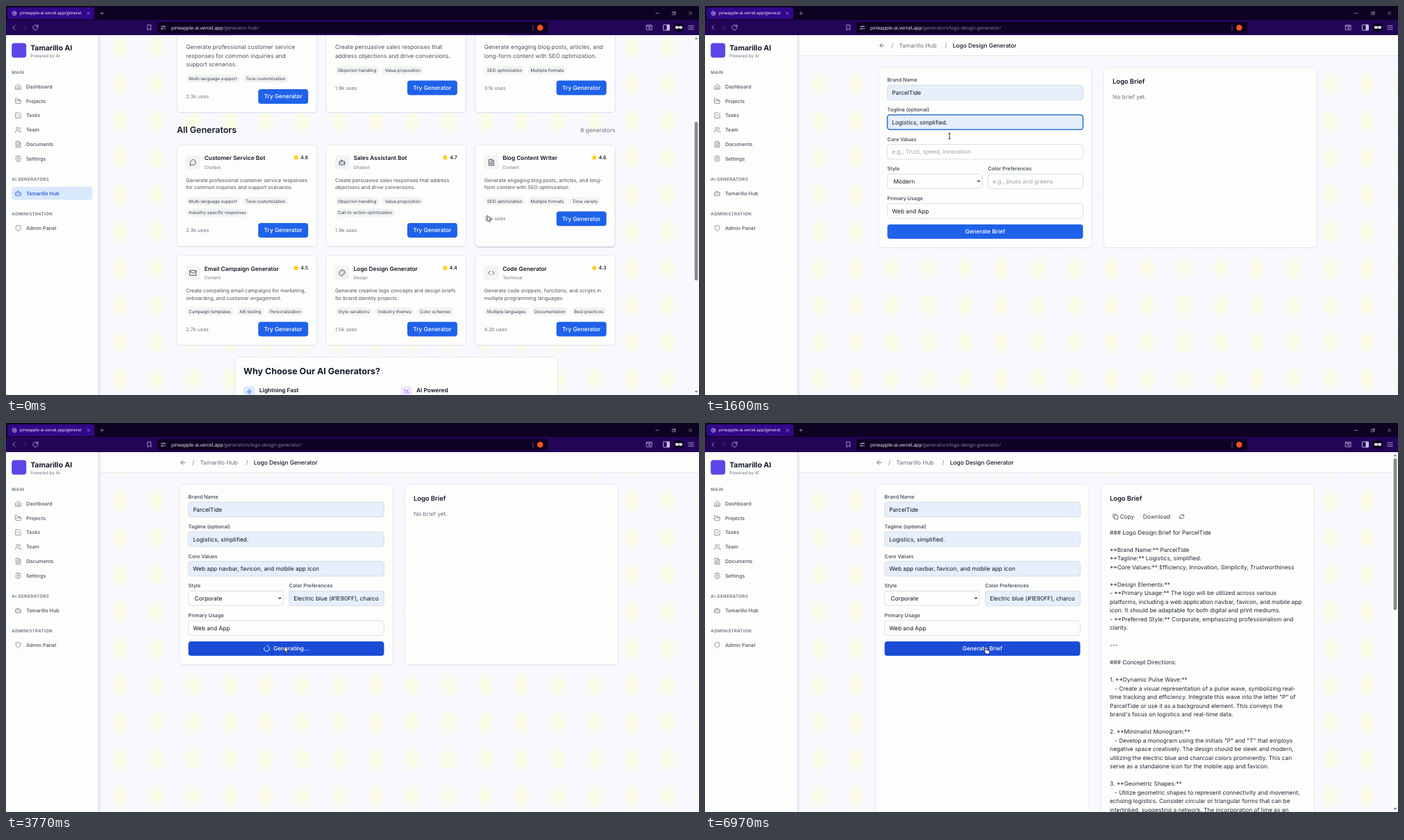
Recreate the animation shown at these times as an HTML page. Size 998x561 px, loop 7 s.

```html
<!DOCTYPE html>
<html lang="en">
<head>
<meta charset="utf-8">
<style>
html, body { margin: 0; width: 100%; height: 100%; overflow: hidden; background: #f8f8fe; }
svg { display: block; width: 998px; height: 561px; font-family: Inter, "Open Sans", sans-serif; }
text { white-space: pre; text-rendering: geometricPrecision; }
.ui { font-family: "Open Sans", "Noto Sans", sans-serif; }
</style>
</head>
<body>
<svg viewBox="0 0 998 561">
  <defs>
    <radialGradient id="glow">
      <stop offset=".3" stop-color="#fbfbe4"/><stop offset="1" stop-color="#fbfbe4" stop-opacity="0"/>
    </radialGradient>
    <pattern id="dots" x="137.7" y="352" width="52.6" height="53.2" patternUnits="userSpaceOnUse">
      <ellipse cx="26.3" cy="26.6" rx="15" ry="21" fill="url(#glow)"/>
    </pattern>
    <linearGradient id="edge">
      <stop stop-color="#d9dae6"/><stop offset="1" stop-color="#f0f0f8" stop-opacity="0"/>
    </linearGradient>
  </defs>
  <g id="page"></g><g id="side"></g><g id="chrome"></g><g id="bar"></g><g id="pointer"></g>
</svg>
<script>
const XS = 6.24, SM = 7.28, MD = 8.32, LG = 9.36, XL = 10.4, XXL = 12.48;
const INK = '#111827', GREY = '#6b7280', TEXT = '#4b5563', PALE = '#9ca3af';
const WHITE = '#fdfefc', LINE = '#e0e3e9', BLUE = '#1f62ea', DEEP = '#1a4cd6';
const $ = id => document.getElementById(id);

const icons = {
  home: 'M3 10l9-7 9 7v11H3zM9 21v-9h6v9',
  folder: 'M6 14l1.5-3H22l-2 9H4a2 2 0 0 1-2-2V4h6l2 3h8v4',
  check: 'M9 11l3 3L22 4M21 12v9H3V3h13',
  users: 'M2 21v-2a4 4 0 0 1 4-4h6a4 4 0 0 1 4 4v2M9 3a4 4 0 1 0 .1 0M22 21v-2a4 4 0 0 0-3-3.9M16 3.1a4 4 0 0 1 0 7.8',
  doc: 'M14 2H4v20h16V8zM14 2v6h6M16 13H8M16 17H8M10 9H8',
  gear: 'M12 9a3 3 0 1 0 .1 0M10 2h4l1 3 3-1 3 4-2 3v2l2 3-3 4-3-1-1 3h-4l-1-3-3 1-3-4 2-3v-2l-2-3 3-4 3 1z',
  bot: 'M12 8V4H8M4 8h16v12H4zM2 14h2M20 14h2M15 13v2M9 13v2',
  shield: 'M12 22s8-4 8-10V5l-8-3-8 3v7c0 6 8 10 8 10',
  chat: 'M7.9 20A9 9 0 1 0 4 16.1L2 22z',
  mail: 'M2 4h20v16H2zM22 7l-10 6L2 7',
  palette: 'M12 2a10 10 0 1 0 0 20c3 0 2-3 1.5-4s0-3 2-3h3c2 0 3.5-1.5 3.5-3.5C22 6 17.5 2 12 2M7 12h.1M9 7.5h.1M14 6.5h.1M18 10h.1',
  code: 'M16 18l6-6-6-6M8 6l-6 6 6 6',
  zap: 'M13 2L3 14h9l-1 8 10-12h-9z',
  wand: 'M4 20L20 4M14 6l4 4M5 4v4M3 6h4M19 14v4M17 16h4',
  trend: 'M22 7l-8.5 8.5-5-5L2 17M16 7h6v6',
  note: 'M21 15a2 2 0 0 1-2 2H7l-4 4V5a2 2 0 0 1 2-2h14a2 2 0 0 1 2 2z',
  copy: 'M8 8h14v14H8zM4 16H2V2h14v2',
  refresh: 'M3 12a9 9 0 0 1 15-6.7L21 8M21 3v5h-5M21 12a9 9 0 0 1-15 6.7L3 16M3 21v-5h5',
  reload: 'M21 12a9 9 0 1 1-3-6.7L21 8M21 2v6h-6',
  back: 'M12 19l-7-7 7-7M19 12H5',
  left: 'M15 4l-8 8 8 8', right: 'M9 4l8 8-8 8', down: 'M4 8l8 8 8-8',
  cross: 'M4 4l16 16M20 4L4 20', plus: 'M12 3v18M3 12h18', minus: 'M3 12h18',
  box: 'M4 4h16v16H4z', windows: 'M3 8h13v13H3zM8 8V3h13v13h-5',
  mark: 'M6 2h12v20l-6-5-6 5z', tune: 'M2 7h9M17 7h5M14 4a3 3 0 1 0 .1 0M13 17h9M2 17h1M7 14a3 3 0 1 0 .1 0',
  globe: 'M12 2a10 10 0 1 0 .1 0M4 7l7 4-2 5 4 5M21 8l-7 1 1 5 5 1',
  menu: 'M2 5h20M2 12h20M2 19h20', find: 'M2 3h20v18H2zM2 7h20M12 10a3 3 0 1 0 .1 0M14 15l3 3',
  star: 'M12 1l3.4 7 7.6 1-5.600 5.300 1.400 7.700L12 18.300 5.200 22l1.400-7.700L1 9l7.600-1z'
};

// y is the middle of the capitals
const T = (x, y, size, weight, fill, str, anchor = 'start', extra = '') =>
  `<text x="${x}" y="${y + size * .36}" font-size="${size}" font-weight="${weight}" fill="${fill}" text-anchor="${anchor}" ${extra}>${str}</text>`;
const R = (x, y, w, h, fill, r = 0, stroke = 'none', sw = .7) =>
  `<rect x="${x}" y="${y}" width="${w}" height="${h}" rx="${r}" fill="${fill}" stroke="${stroke}" stroke-width="${sw}"/>`;
const I = (name, x, y, size, color, fill = 'none', sw = 2) =>
  `<path d="${icons[name]}" transform="translate(${x - size / 2} ${y - size / 2}) scale(${size / 24})" fill="${fill}" stroke="${color}" stroke-width="${sw}" stroke-linecap="round" stroke-linejoin="round"/>`;
const panel = (x, y, w, h, stroke = LINE) =>
  R(x, y + .8, w, h, '#dfe1ea', 5) + R(x, y, w, h, WHITE, 5, stroke);
const backdrop = () => R(133, 0, 865, 700, '#f8f8fe') + R(133, 0, 865, 700, 'url(#dots)');

const pen = document.createElement('canvas').getContext('2d');
function chips(x, y, rows) {
  pen.font = `400 ${XS}px Inter`;
  return rows.split('/').map((row, i) => {
    let cx = x;
    return row.split('|').map(label => {
      const w = pen.measureText(label).width + 8.32, cy = y + i * 16.6;
      const out = R(cx, cy - 6, w, 12, '#f2f4f4', 6) + T(cx + 4.16, cy, XS, 400, '#374151', label);
      cx += w + 4.16;
      return out;
    }).join('');
  }).join('');
}
const action = (x, y, uses) =>
  T(x + 13, y, SM, 400, GREY, uses + 'k uses') + R(x + 117, y - 10.5, 72, 21, BLUE, 4) +
  T(x + 153, y, MD, 500, '#fff', 'Try Generator', 'middle');

const columns = [246.2, 460.9, 675.7];
const featured = [
  ['Generate professional customer service/responses for common inquiries and/support scenarios.', 'Multi-language support|Tone customization', 2.3],
  ['Create persuasive sales responses that/address objections and drive conversions.', 'Objection handling|Value proposition', 1.9],
  ['Generate engaging blog posts, articles, and/long-form content with SEO optimization.', 'SEO optimization|Multiple formats', 3.1]
];
const generators = [
  ['chat', 'Customer Service Bot', 'Chatbot', 4.8, 'Generate professional customer service responses/for common inquiries and support scenarios.', 'Multi-language support|Tone customization/Industry-specific responses', 2.3],
  ['bot', 'Sales Assistant Bot', 'Chatbot', 4.7, 'Create persuasive sales responses that address/objections and drive conversions.', 'Objection handling|Value proposition/Call-to-action optimization', 1.9],
  ['doc', 'Blog Content Writer', 'Content', 4.6, 'Generate engaging blog posts, articles, and long-/form content with SEO optimization.', 'SEO optimization|Multiple formats|Tone variety', 3.1],
  ['mail', 'Email Campaign Generator', 'Content', 4.5, 'Create compelling email campaigns for marketing,/onboarding, and customer engagement.', 'Campaign templates|A/B testing|Personalization'.replace('A/B', 'A\u2215B'), 2.7],
  ['palette', 'Logo Design Generator', 'Design', 4.4, 'Generate creative logo concepts and design briefs/for brand identity projects.', 'Style variations|Industry themes|Color schemes', 1.5],
  ['code', 'Code Generator', 'Technical', 4.3, 'Generate code snippets, functions, and scripts in/multiple programming languages.', 'Multiple languages|Documentation|Best practices', 4.2]
];
const reasons = [
  ['zap', '#dbeafe', '#2563eb', 'Lightning Fast', 'Generate high-quality content in seconds, not hours'],
  ['wand', '#f3e8ff', '#9333ea', 'AI Powered', 'Advanced AI models trained on millions of examples'],
  ['trend', '#dcfce7', '#16a34a', 'SEO Optimized', 'Built-in SEO best practices for better search rankings'],
  ['note', '#dbeafe', '#2563eb', 'Customizable', 'Tailor outputs to match your brand voice and style']
];

function hub(hover) {
  let out = backdrop();
  featured.forEach(([text, tags, uses], i) => {
    const x = columns[i], lines = text.split('/'), gap = 12.5 * (lines.length - 2);
    out += panel(x, 0, 201.5, 153.5, '#cbdcf5') + R(x + 44, 34, 36, 11, '#eaeef8', 5);
    lines.forEach((l, k) => out += T(x + 13, 59.5 + 12.5 * k, MD, 400, TEXT, l));
    out += chips(x + 13, 92.5 + gap, tags) + action(x, 118 + gap, uses);
  });
  out += T(246, 179, XXL, 600, INK, 'All Generators') + T(877.5, 179.5, MD, 400, GREY, '6 generators', 'end');
  generators.forEach(([icon, name, kind, score, text, tags, uses], i) => {
    const x = columns[i % 3], y = i < 3 ? 200.3 : 359.6, rows = tags.split('/').length;
    if (hover && i == 2) out += R(x - .5, y + 1, 202.5, 147.500, '#d3d6df', 6);
    out += panel(x, y, 201.5, i < 3 ? 146.3 : 129.5) + R(x + 13, y + 15, 20.500, 20.500, '#f2f3f4', 4) +
      I(icon, x + 23.2, y + 25.3, 10.4, '#374151') + T(x + 39.5, y + 19, MD, 600, INK, name) +
      T(x + 39.5, y + 32.2, XS, 400, GREY, kind) + I('star', x + 171.5, y + 18, 8, '#facc15', '#facc15') +
      T(x + 189, y + 18, SM, 500, INK, score, 'end');
    text.split('/').forEach((l, k) => out += T(x + 13, y + 51 + 10.5 * k, SM, 400, TEXT, l));
    out += chips(x + 13, y + 81, tags) + action(x, y + 106.500 + 16.6 * (rows - 1), uses);
  });
  out += panel(329.7, 506.3, 465, 150) + T(342, 527, XXL, 700, INK, 'Why Choose Our AI Generators?');
  reasons.forEach(([icon, bg, color, name, text], i) => {
    const x = 342 + 226.2 * (i % 2), y = 555 + 31.2 * (i >> 1);
    out += R(x, y - 7, 16.600, 16.600, bg, 4) + I(icon, x + 8.3, y + 1.3, 8.300, color) +
      T(x + 22.800, y - .5, MD, 600, INK, name) + T(x + 22.800, y + 11, SM, 400, TEXT, text);
  });
  return out;
}

const brief = `### Logo Design Brief for ParcelTide

**Brand Name:** ParcelTide
**Tagline:** Logistics, simplified.
**Core Values:** Efficiency, Innovation, Simplicity, Trustworthiness

**Design Elements:**
- **Primary Usage:** The logo will be utilized across various
platforms, including a web application navbar, favicon, and mobile app
icon. It should be adaptable for both digital and print mediums.
- **Preferred Style:** Corporate, emphasizing professionalism and
clarity.

---

### Concept Directions:

1. **Dynamic Pulse Wave:**
   - Create a visual representation of a pulse wave, symbolizing real-
time tracking and efficiency. Integrate this wave into the letter "P" of
ParcelTide or use it as a background element. This conveys the
brand's focus on logistics and real-time data.

2. **Minimalist Monogram:**
   - Develop a monogram using the initials "P" and "T" that employs
negative space creatively. The design should be sleek and modern,
utilizing the electric blue and charcoal colors prominently. This can
serve as a standalone icon for the mobile app and favicon.

3. **Geometric Shapes:**
   - Utilize geometric shapes to represent connectivity and movement,
echoing logistics. Consider circular or triangular forms that can be
interlinked, suggesting a network. The incorporation of lime as an`.split('\n');

// label, x, y, width, placeholder, value
const fields = [
  ['Brand Name', 262.6, 114.2, 281.8, 'e.g., Ombrett', 'ParcelTide'],
  ['Tagline (optional)', 262.6, 157, 281.8, 'e.g., Payments, simplified.', 'Logistics, simplified.'],
  ['Core Values', 262.6, 199.6, 281.8, 'e.g., Trust, speed, innovation', 'Web app navbar, favicon, and mobile app icon'],
  ['Color Preferences', 407.6, 242.3, 136.800, 'e.g., blues and greens', 'Electric blue (#1E90FF), charco']
];

function input([label, x, y, w, hint, value], filled, focused) {
  return T(x, y - 7.5, SM, 500, '#374151', label) +
    R(x, y, w, 21.300, filled ? '#e6effb' : WHITE, 4, focused ? '#2f72d8' : '#d1d5db', focused ? 1.6 : .8) +
    T(x + 6.700, y + 10.8, MD, 400, filled ? INK : PALE, filled ? value : hint) +
    (focused && !filled ? R(x + 6.500, y + 6, .7, 10, INK) : '');
}

function form({ filled, focus, style, busy, hot, done }) {
  let out = R(133, 42, 865, 29.300, WHITE) + R(133, 71, 865, .8, LINE) + `<g transform="translate(${done ? -4 : 0})">` +
    I('back', 254.8, 57, 10, TEXT) + T(268, 57, MD, 400, GREY, '/') + T(279.5, 57, MD, 400, GREY, 'Tamarillo Hub') +
    T(345.5, 57, MD, 400, GREY, '/') + T(356.8, 57, MD, 500, INK, 'Logo Design Generator') +
    panel(250, 88.800, 307.3, done ? 500 : 259.700) + panel(574.2, 88.800, 307.3, done ? 500 : 259.700);
  fields.forEach((f, i) => out += input(f, i < filled, i == focus));
  out += T(262.6, 234.800, SM, 500, '#374151', 'Style') + R(262.6, 242.3, 136.800, 20.800, WHITE, 4, '#d1d5db', .8) +
    T(271.6, 252.8, MD, 400, INK, style) + I('down', 394.2, 252.6, 5, INK, 'none', 5) +
    input(['Primary Usage', 262.6, 285, 281.8, '', 'Web and App'], true).replace('#e6effb', WHITE) +
    R(262.6, 315, 281.8, 20.800, hot ? DEEP : BLUE, 4) +
    (busy ? T(385, 325.4, MD, 500, '#fff', 'Generating...') +
        '<path id="spin" d="M3.9 0A3.9 3.9 0 1 1 1.200 -3.700" fill="none" stroke="#fff" stroke-width=".9" stroke-linecap="round"/>'
      : T(403.500, 325.4, MD, 500, '#fff', 'Generate Brief', 'middle')) +
    T(587, 108.500, LG, 600, INK, 'Logo Brief');
  if (done) {
    out += I('copy', 595.2, 135, 8.300, '#374151') + T(601.5, 135, MD, 400, '#374151', 'Copy') +
      T(634.800, 135, MD, 400, '#374151', 'Download') + I('refresh', 690.6, 135, 8, '#374151');
    brief.forEach((l, k) => out += T(587, 158 + 12.5 * k, MD, 400, '#1f2937', l));
  } else out += T(587, 131, MD, 400, GREY, 'No brief yet.');
  return backdrop() + out + '</g>';
}

function sidebar(active) {
  const row = (icon, y, name, on) => (on ? R(8.2, 260.8, 116.300, 18.800, '#d9e8fb', 4) : '') +
    I(icon, 17.6, y, 10, on ? '#2563eb' : GREY, 'none', 1.800) + T(28.900, y, SM, 500, on ? '#1d4ed8' : TEXT, name);
  const head = (y, name) => T(8.3, y, XS, 600, GREY, name, 'start', 'letter-spacing=".31"');
  const main = [['home', 'Dashboard'], ['folder', 'Projects'], ['check', 'Tasks'], ['users', 'Team'], ['doc', 'Documents'], ['gear', 'Settings']];
  return R(133, 42, 5, 519, 'url(#edge)') + R(0, 42, 133, 519, WHITE) + R(8.2, 53.5, 21, 21, '#5b46e8', 4) +
    T(35.2, 60, XL, 700, INK, 'Tamarillo AI') + T(35.2, 71.300, XS, 400, GREY, 'Powered by AI') + head(96, 'MAIN') +
    main.map(([icon, name], i) => row(icon, 116.2 + 20.800 * i, name)).join('') +
    head(250.2, 'AI GENERATORS') + row('bot', 270.3, 'Tamarillo Hub', active) +
    head(300, 'ADMINISTRATION') + row('shield', 320.3, 'Admin Panel');
}

function chrome(path) {
  const host = 'pineapple-ai.vercel.app', lilac = '#c9bdf0';
  return R(0, 0, 998, 21, '#0e0222') + R(0, 20, 998, 22, '#220556') + R(2, 2, 125.500, 17, '#32088a', 4) +
    I('globe', 12, 10.5, 7, '#fff') + T(20, 10.3, 6, 400, '#fff', host + '/generat', 'start', 'class="ui"') +
    I('cross', 118.700, 10.5, 5, '#fff') + I('plus', 138.2, 10.5, 6, '#ddd') +
    I('minus', 938, 10.5, 6, '#ddd') + I('windows', 962, 10.5, 6, '#ddd') + I('cross', 985.6, 10.5, 6, '#ddd') +
    I('left', 11.800, 31, 9, lilac) + I('right', 27, 31, 9, '#5a4390') + I('reload', 42.5, 31, 9.500, lilac) +
    I('mark', 206.500, 31, 9, lilac) + R(218, 23, 563, 16.500, '#0d0322', 4) + I('tune', 226.6, 31.2, 8, '#e5e0f5') +
    T(238, 31.3, 6.9, 400, '#fff', `${host}<tspan fill="#938aa8">${path}</tspan>`, 'start', 'class="ui"') +
    R(758.600, 27, .8, 9, '#6a55a5') + '<circle cx="769.300" cy="31.300" r="4.3" fill="#f4511e"/>' +
    I('find', 926.300, 31, 9, lilac) + R(946.5, 27, 9, 8, 'none', 1, lilac, .9) + R(951.500, 27, 4, 8, lilac) +
    R(961.5, 25, 15, 12, '#0d0322', 5) + R(964, 29.500, 4.600, 3.200, '#fff', 1.500) + R(969.300, 29.500, 4.600, 3.200, '#fff', 1.500) +
    R(964, 29.3, 10, 1, '#fff') + I('menu', 986.5, 31, 9, lilac);
}

const scrollbar = top => R(990, 42, 8, 519, '#fbfbfc') + R(991.6, top, 4.800, 229 - (top < 60 ? 10 : 0), '#8b8b8e', 2.4) +
  '<path d="M991.800 48l2.200-3 2.200 3zM991.800 555l2.200 3 2.200-3z" fill="#777"/>';

const pointers = {
  arrow: '<path d="M0 0v8.300l1.900-1.700 1.400 3 1.300-.6-1.300-2.900h2.600z" fill="#fff" stroke="#111" stroke-width=".7"/>',
  beam: '<path d="M-1.500-4h3M0-4v8M-1.500 4h3" fill="none" stroke="#111" stroke-width=".9"/>',
  hand: '<path d="M-1 .8a.9.9 0 0 1 1.800 0v3l3.700 1q1 .3.800 1.500l-.7 3.200h-4.200l-3-4q0-1.300 1.600-.3z" fill="#fff" stroke="#111" stroke-width=".7"/>'
};
// time, x, y, pointer shape from then on
const track = [
  [0, 693, 302, 'arrow'], [170, 693, 304, 'arrow'], [230, 693, 304, 'arrow'], [430, 613, 412, 'hand'],
  [520, 613, 412, 'arrow'], [780, 357, 130, 'beam'], [1200, 357, 130, 'beam'], [1320, 352, 169, 'beam'],
  [1550, 352, 169, 'beam'], [1660, 352, 211, 'beam'], [1850, 352, 211, 'beam'], [1980, 440, 254, 'beam'],
  [2130, 440, 254, 'arrow'], [2300, 356, 250, 'arrow'], [2500, 356, 250, 'arrow'], [2700, 330, 290, 'arrow'],
  [2900, 330, 290, 'arrow'], [3350, 401, 322, 'hand'], [3550, 401, 322, 'arrow'], [6250, 401, 322, 'hand'],
  [6500, 404.500, 323.500, 'hand'], [7000, 404.500, 323.500, 'hand']
];
const ease = p => p * p * (3 - 2 * p);
const fillTimes = [1180, 1500, 1800, 2100], focusTimes = [800, 1320, 1660, 1980];
let last;

function frame() {
  const t = performance.now() % 7000, onHub = t < 500, done = t >= 6250;
  const count = times => times.filter(at => t >= at).length;
  const state = {
    filled: count(fillTimes), focus: t < 2500 ? count(focusTimes) - 1 : -1,
    style: t < 2750 ? 'Modern' : 'Corporate', busy: t >= 3550 && !done, hot: t >= 3350, done
  };
  const hover = t < 80, key = JSON.stringify([onHub, hover, state]);
  if (key != last) {
    last = key;
    $('page').innerHTML = onHub ? hub(hover) : form(state);
    $('side').innerHTML = sidebar(onHub);
    $('chrome').innerHTML = chrome(onHub ? '/generator-hub/' : '/generators/logo-design-generator/');
  }
  const p = ease(Math.min(1, Math.max(0, (t - 25) / 130)));
  $('page').setAttribute('transform', `translate(0 ${onHub ? -52 * p : 0})`);
  $('bar').innerHTML = onHub ? scrollbar(167 + 23 * p) : done ? scrollbar(51) : '';
  if (state.busy) $('spin').setAttribute('transform', `translate(375.400 325.400) rotate(${(t - 3770) * .65 - 80})`);

  const i = track.findLastIndex(k => k[0] <= t), [t0, x0, y0, shape] = track[i], [t1, x1, y1] = track[i + 1];
  const q = ease((t - t0) / (t1 - t0));
  $('pointer').innerHTML = pointers[shape];
  $('pointer').setAttribute('transform', `translate(${x0 + (x1 - x0) * q} ${y0 + (y1 - y0) * q})`);
  requestAnimationFrame(frame);
}
frame();
</script>
</body>
</html>
```
